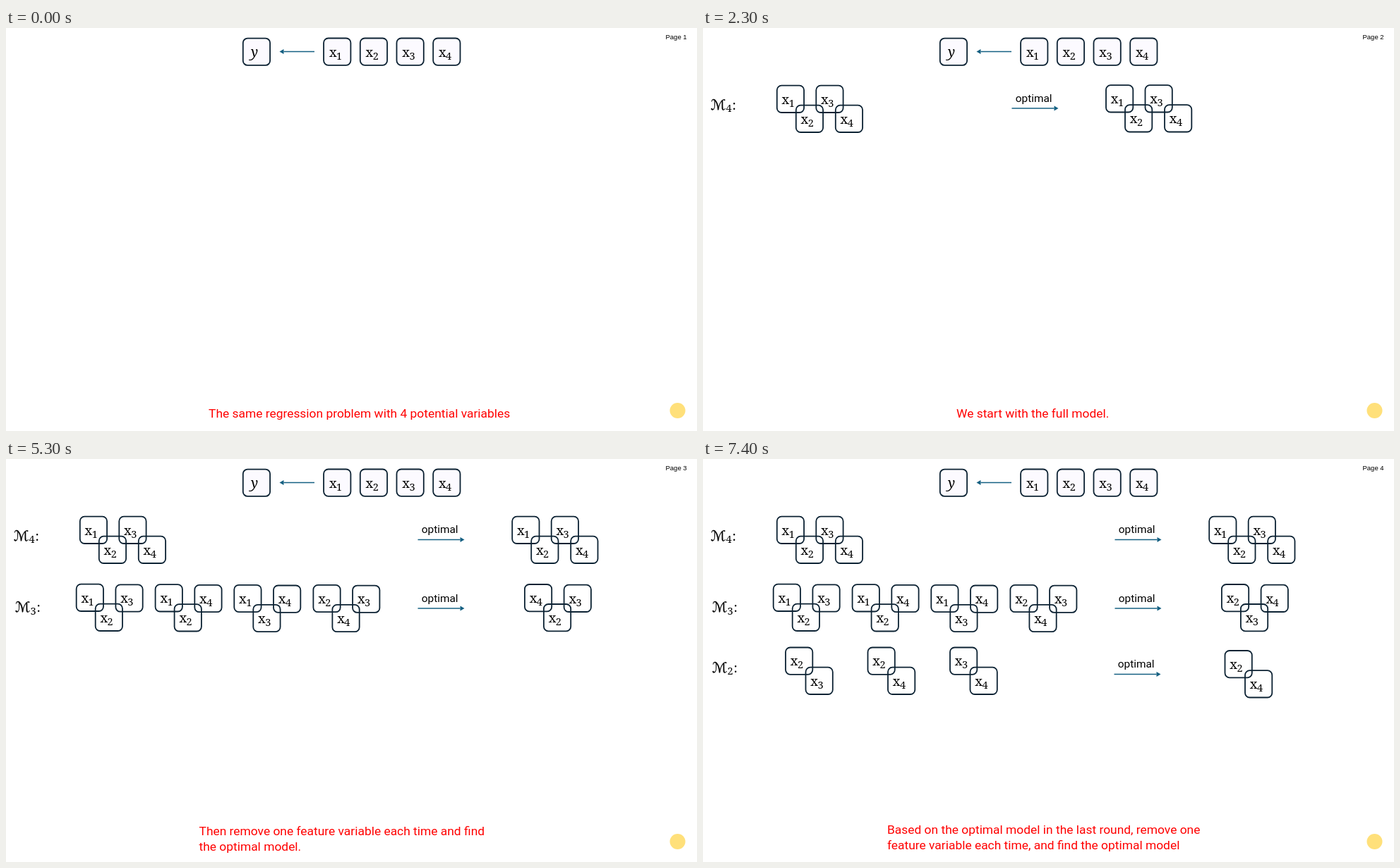
An HTML page that plays this animation: 979x572 px, repeating every 8000 ms.

```html
<!DOCTYPE html>
<html lang="en">
<head>
<meta charset="utf-8">
<title>Backward selection</title>
<style>
  html, body { margin: 0; width: 100%; height: 100%; overflow: hidden; background: #fff; }
  svg { display: block; width: 100vw; height: 100vh; }
  .box { fill: none; stroke: #0c2233; stroke-width: 1.8; }
  .tint { fill: #fcfaff; }
  .line { stroke: #156082; stroke-width: 1.7; }
  .head { fill: #156082; }
  .var { font: 18.5px "Noto Serif", serif; }
  .sub { font: 14.5px "Noto Serif", serif; }
  .resp { font: italic 19px "Noto Serif", serif; }
  .script { font: 20px "DejaVu Sans", sans-serif; stroke: #000; stroke-width: .3; }
  .opt { font: 15.4px Roboto, sans-serif; }
  .note { font: 17.4px Roboto, sans-serif; fill: #f00; }
  .page { font: 9.5px "Liberation Sans", Arial, sans-serif; }

  .p1, .p2, .p3, .p4, .from2, .from3 { opacity: 0; animation: 8s step-end infinite; }
  .p1 { animation-name: p1; }
  .p2 { animation-name: p2; }
  .p3 { animation-name: p3; }
  .p4 { animation-name: p4; }
  .from2 { animation-name: from2; }
  .from3 { animation-name: from3; }
  @keyframes p1 { 0% { opacity: 1 } 6.25%, 100% { opacity: 0 } }
  @keyframes p2 { 0% { opacity: 0 } 6.25% { opacity: 1 } 43.75%, 100% { opacity: 0 } }
  @keyframes p3 { 0% { opacity: 0 } 43.75% { opacity: 1 } 81.25%, 100% { opacity: 0 } }
  @keyframes p4 { 0% { opacity: 0 } 81.25%, 100% { opacity: 1 } }
  @keyframes from2 { 0% { opacity: 0 } 6.25%, 100% { opacity: 1 } }
  @keyframes from3 { 0% { opacity: 0 } 43.75%, 100% { opacity: 1 } }
</style>
</head>
<body>
<svg id="stage" viewBox="0 0 979 572"></svg>
<script>
const text = (cls, x, y, s) => `<text class="${cls}" x="${x}" y="${y}">${s}</text>`;
const frame = (x, y, tint = '') =>
  `<rect class="box ${tint}" x="${x}" y="${y}" width="38.3" height="38.3" rx="6.5"/>`;
const label = (x, y, n) => text('var', x, y, 'x') + text('sub', x + 10.1, y + 4, n);
const card = (x, y, n) => frame(x, y) + label(x + 6.8, y + 25.8, n);

// Overlapping cards: digits are variable indices, offsets their layout
const cluster = offsets => (x, y, digits) =>
  offsets.map(([dx, dy], i) => card(x + dx, y + dy, digits[i])).join('');
const quad = cluster([[0, 0], [27, 28], [55.5, 0], [83, 28]]);
const tri = cluster([[0, 0], [55.7, .7], [27, 28]]);
const pair = cluster([[0, 0], [28.5, 28.2]]);

const arrow = (x1, x2, y) => {
  const back = x2 - 6 * Math.sign(x2 - x1);
  return `<path class="line" d="M${x1} ${y}H${back}"/>` +
    `<path class="head" d="M${x2} ${y}L${back} ${y - 3.4}V${y + 3.4}Z"/>`;
};
const optimal = (x, y) => text('opt', x + 5.3, y - 9.4, 'optimal') + arrow(x, x + 66, y);
const model = (x, y, n) => text('script', x, y, 'ℳ') +
  text('sub', x + 21.5, y + 3.5, n) + text('var', x + 30.5, y, ':');
const page = n => text('page', 934.5, 16, 'Page ' + n);
const note = (x, y, ...lines) =>
  lines.map((s, i) => text('note', x, y + 22 * i, s)).join('');
const group = (cls, ...parts) => `<g class="${cls}">${parts.join('')}</g>`;

const header = [1, 2, 3, 4].map(n => {
  const x = 398.4 + 51.7 * n;
  return frame(x, 14.5, 'tint') + label(x + 7.8, 40.9, n);
});

document.getElementById('stage').innerHTML = [
  group('',
    frame(335.8, 14.6, 'tint'), text('resp', 347, 41, 'y'), arrow(437, 387.5, 33.5), ...header,
    '<circle cx="951.5" cy="543" r="11" fill="#ffe07a"/>'),

  group('p1', page(1),
    note(287, 553, 'The same regression problem with 4 potential variables')),

  group('from2', model(11, 115.5, 4), quad(104.8, 81.7, '1234')),
  group('p2', page(2), optimal(437.5, 114), quad(571, 81.2, '1234'),
    note(359, 553, 'We start with the full model.')),

  group('from3',
    optimal(583.5, 114.5), quad(717.2, 81.7, '1234'),
    model(13, 217, 3),
    tri(99.7, 177.7, '132'), tri(211.6, 178.2, '142'),
    tri(323.3, 178.8, '143'), tri(435.4, 178.9, '234'),
    optimal(583.5, 212)),
  group('p3', page(3), tri(734.9, 178, '432'),
    note(273.5, 533.5, 'Then remove one feature variable each time and find',
      'the optimal model.')),

  group('p4', page(4), tri(734.9, 178, '243'),
    model(13, 302.5, 2),
    pair(117, 267.5, '23'), pair(233.5, 267.5, '24'), pair(350, 267.5, '34'),
    optimal(582.5, 305.5), pair(739.5, 272, '24'),
    note(261, 532, 'Based on the optimal model in the last round, remove one',
      'feature variable each time, and find the optimal model'))
].join('');
</script>
</body>
</html>
```
